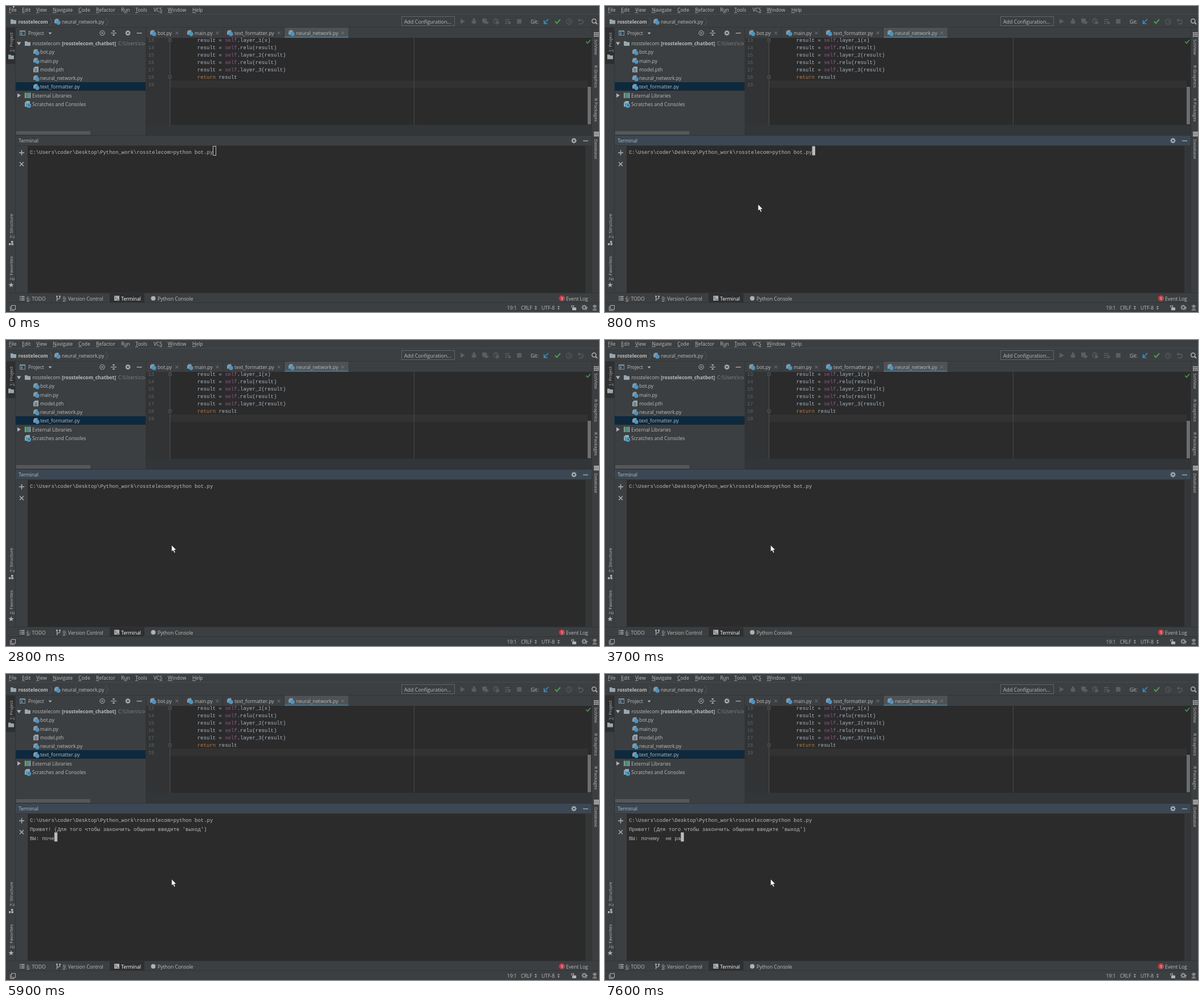
An HTML page with a canvas that plays this animation: 1041x538 px, repeating every 8 s.

```html
<!DOCTYPE html>
<html lang="en">
<head>
<meta charset="utf-8">
<title>Chatbot terminal</title>
<style>
  html, body { margin: 0; width: 100%; height: 100%; overflow: hidden; background: #3c3f41; }
  canvas { display: block; }
</style>
</head>
<body>
<canvas id="stage" width="1041" height="538"></canvas>
<script>
const W = 1041, H = 538, LOOP = 8000;
const SANS = '"Open Sans", "Noto Sans", sans-serif';
const UI = '8.6px ' + SANS, BOLD = 'bold ' + UI, SIDE = '8px ' + SANS, BUTTON = '8.9px ' + SANS;
const MONO = '8.93px "Liberation Mono", "Courier New", monospace';
const CELL = 5.36;
const PANEL = '#3c3f41', DARK = '#2b2b2b', EDGE = '#323435', TEXT = '#bbbbbb', ICON = '#afb1b3', OFF = '#5b5d5f';
const TAU = Math.PI * 2;

const stage = document.getElementById('stage');
const screen = stage.getContext('2d');
const base = document.createElement('canvas');
base.width = W;
base.height = H;
let g = base.getContext('2d');

function rect(x, y, w, h, color) {
  g.fillStyle = color;
  g.fillRect(x, y, w, h);
}

function frame(x, y, w, h, color, lw = 1) {
  g.strokeStyle = color;
  g.lineWidth = lw;
  g.strokeRect(x, y, w, h);
}

function dot(x, y, r, color) {
  g.fillStyle = color;
  g.beginPath();
  g.arc(x, y, r, 0, TAU);
  g.fill();
}

function ring(x, y, r, color, lw = 1) {
  g.strokeStyle = color;
  g.lineWidth = lw;
  g.beginPath();
  g.arc(x, y, r, 0, TAU);
  g.stroke();
}

function trace(pts) {
  g.beginPath();
  for (let i = 0; i < pts.length; i += 2) g.lineTo(pts[i], pts[i + 1]);
}

function line(color, lw, ...pts) {
  trace(pts);
  g.strokeStyle = color;
  g.lineWidth = lw;
  g.stroke();
}

function poly(color, ...pts) {
  trace(pts);
  g.closePath();
  g.fillStyle = color;
  g.fill();
}

// Draws text around a vertical centre; "&" underlines the next letter.
function label(str, x, cy, color = TEXT, font = UI) {
  const at = str.indexOf('&');
  const s = str.replace('&', '');
  g.font = font;
  g.fillStyle = color;
  g.fillText(s, x, cy + 3);
  if (at < 0) return;
  const left = g.measureText(s.slice(0, at)).width;
  rect(x + left, cy + 4.3, g.measureText(s[at]).width, 0.8, color);
}

function turned(str, x, y, dir) {
  g.save();
  g.translate(x, y);
  g.rotate(dir * Math.PI / 2);
  label(str, 0, 0, TEXT, SIDE);
  g.restore();
}

function mono(str, x, cy, color) {
  label(str, x, cy, color, MONO);
}

function page(x, y) {
  poly('#9aa7b0', x + 3, y, x + 9, y, x + 9, y + 10, x, y + 10, x, y + 3);
}

function pyFile(x, cy) {
  poly('#8b979f', x + 2.5, cy - 5, x + 7.5, cy - 5, x + 7.5, cy + 3, x, cy + 3, x, cy - 2.5);
  dot(x + 7, cy + 1.8, 3.7, '#4596c8');
}

function folder(x, cy) {
  poly('#9aa7b0', x, cy - 4, x + 4, cy - 4, x + 5.3, cy - 2.5, x + 10, cy - 2.5, x + 10, cy + 4, x, cy + 4);
}

function cross(x, y, r, color, lw = 1) {
  line(color, lw, x - r, y - r, x + r, y + r);
  line(color, lw, x + r, y - r, x - r, y + r);
}

function gear(x, y, color = ICON) {
  for (let i = 0; i < 8; i++) {
    const c = Math.cos(i * TAU / 8), s = Math.sin(i * TAU / 8);
    line(color, 1.6, x + 2.5 * c, y + 2.5 * s, x + 4.7 * c, y + 4.7 * s);
  }
  ring(x, y, 2.6, color, 1.7);
}

function chevron(x, cy) {
  line('#55585a', 1, x, cy - 7, x + 4, cy, x, cy + 7);
}

function bars(x, y) {
  for (let i = 0; i < 3; i++) {
    rect(x, y + i * 3, 1.6, 1.5, ICON);
    rect(x + 2.6, y + i * 3, 6, 1.5, ICON);
  }
}

function drawMenu() {
  const items = [['&File', 5], ['&Edit', 28], ['&View', 53], ['&Navigate', 82], ['&Code', 127], ['&Refactor', 158],
    ['R&un', 202], ['&Tools', 227], ['VC&S', 259], ['&Window', 284], ['&Help', 327]];
  for (const [s, x] of items) label(s, x, 7);
  rect(0, 14, W, 1, '#484b4d');
}

function drawToolbar() {
  folder(8, 27.5);
  label('rosstelecom', 21.5, 27.5, TEXT, BOLD);
  chevron(77, 27.5);
  pyFile(85, 27.5);
  label('neural_network.py', 98, 27.5);
  chevron(175, 27.5);
  frame(694.5, 18.5, 93, 16, '#626567');
  label('Add Configuration...', 699, 27.5, TEXT, BUTTON);

  poly(OFF, 798, 22.5, 806, 27, 798, 31.5);
  dot(821.5, 28, 3.6, OFF);
  rect(817, 26, 9, 1, OFF);
  rect(817, 29, 9, 1, OFF);
  dot(821.5, 23.5, 2, OFF);
  poly(OFF, 836, 22, 844, 22, 844, 27, 840, 31.5, 836, 28);
  poly(OFF, 842, 25, 848, 29, 842, 33);
  ring(860, 26.5, 4, OFF, 1.3);
  line(OFF, 1, 860, 24, 860, 27, 862, 27);
  poly(OFF, 861, 26, 867, 29.5, 861, 33);
  for (let i = 0; i < 3; i++) rect(876, 23 + i * 3.5, 8 - i * 2, 1.4, OFF);
  poly(OFF, 882, 26, 887, 29.5, 882, 33);
  rect(897, 23, 8, 8, OFF);

  label('Git:', 921, 27.5);
  line('#3592c4', 1.7, 952, 23, 945, 30.5);
  line('#3592c4', 1.7, 944.7, 25, 944.7, 31, 950.5, 31);
  line('#499c54', 2, 964, 27, 967, 30.5, 973, 23.5);
  ring(988.5, 27.5, 4.6, OFF, 1.2);
  line(OFF, 1.1, 988.5, 24.5, 988.5, 28, 991, 29);
  line(OFF, 1.3, 1007, 22.5, 1004.5, 25, 1007, 27.5);
  line(OFF, 1.3, 1005, 25, 1011, 25, 1013, 27, 1013, 29, 1011, 31.5, 1006, 31.5);
  ring(1032.3, 26.3, 3.6, ICON, 1.5);
  line(ICON, 1.8, 1035, 29, 1038, 32);
  rect(0, 37, W, 1, EDGE);
}

function drawStripes() {
  rect(0, 38, 16, 64, '#2d2f30');
  rect(16, 38, 1, 466, EDGE);
  rect(1028, 38, 1, 466, EDGE);
  turned('&1: Project', 9.3, 81, -1);
  folder(4, 89.5);
  turned('&7: Structure', 9.3, 408.5, -1);
  rect(9, 413, 3.4, 3.4, ICON);
  rect(5, 417, 3.4, 3.4, ICON);
  rect(9.5, 417, 3.4, 3.4, ICON);
  turned('&2: Favorites', 9.3, 482.5, -1);
  const star = [];
  for (let i = 0; i < 10; i++) {
    const r = i % 2 ? 2 : 5, a = i * Math.PI / 5;
    star.push(9 + r * Math.sin(a), 490.5 - r * Math.cos(a));
  }
  poly(ICON, ...star);

  for (let i = 0; i < 9; i++) rect(1032 + i % 3 * 3, 46 + Math.floor(i / 3) * 3, 2.2, 2.2, ICON);
  turned('SciView', 1036, 58.5, 1);
  turned('R Graphics', 1036, 104, 1);
  turned('R Packages', 1036, 162, 1);
  for (let i = 0; i < 3; i++) rect(1032, 221 + i * 3, 9, 2.3, ICON);
  turned('Database', 1036, 234, 1);
}

function drawProject() {
  frame(24.5, 43.5, 9, 8, '#87939a');
  rect(24, 43, 10, 2.2, '#87939a');
  rect(26, 46.5, 3, 4, '#3592c4');
  label('Project', 39, 48);
  poly(ICON, 74.5, 46.5, 80.5, 46.5, 77.5, 50);
  ring(169, 47.5, 4.2, ICON, 1);
  cross(169, 47.5, 2, ICON, 1);
  rect(184, 47, 10, 1.2, ICON);
  poly(ICON, 186.5, 43, 191.5, 43, 189, 46);
  poly(ICON, 186.5, 52, 191.5, 52, 189, 49);
  gear(214, 47.5);
  rect(229.5, 47, 9, 1.3, ICON);

  rect(17, 134, 228, 15, '#0d293e');
  poly(ICON, 19, 63.5, 26.5, 63.5, 22.7, 69);
  folder(33, 66);
  label('rosstelecom', 46.5, 66);
  label('[rosstelecom_chatbot]', 98, 66, TEXT, BOLD);
  g.save();
  g.beginPath();
  g.rect(17, 56, 227, 20);
  g.clip();
  label('C:\\Users\\coder', 197, 66, '#808080');
  g.restore();

  const files = ['bot.py', 'main.py', 'model.pth', 'neural_network.py', 'text_formatter.py'];
  files.forEach((name, i) => {
    const y = 81 + i * 15.3;
    if (name.endsWith('.py')) pyFile(48, y);
    else {
      page(48, y - 5);
      for (let k = 0; k < 3; k++) rect(50, y - 1.5 + k * 2, 5, 0.9, '#4b555c');
    }
    label(name, 60, y + 0.2);
  });
  poly(ICON, 20, 153.5, 26, 157.3, 20, 161);
  ['#9aa7b0', '#62b543', '#40b6e0', '#9aa7b0'].forEach((c, i) => rect(33 + i * 2.8, 152.5, 1.9, 9.5, c));
  label('External Libraries', 46, 157.5);
  page(33, 167);
  line('#3c3f41', 0.9, 35, 171, 37, 173, 35, 175);
  dot(40, 175, 4, '#40a6d0');
  line('#28444f', 1, 40, 172.5, 40, 175.3, 42, 175.3);
  label('Scratches and Consoles', 46, 173);
  rect(18, 220, 130, 6, '#555759');
}

function drawEditor() {
  rect(245, 56, 783, 153, DARK);
  rect(245, 56, 43, 153, '#313335');
  rect(245, 209, 783, 18, '#333638');
  rect(288, 131, 733, 13, '#323232');
  rect(287.5, 56, 1, 153, '#555555');
  rect(716, 56, 1, 153, '#4b4b4b');
  rect(1021, 142, 6, 66, '#6c6d6e');

  const calls = ['layer_1(x)', 'relu(result)', 'layer_2(result)', 'relu(result)', 'layer_3(result)'];
  for (let i = 0; i < 7; i++) {
    const y = 60 + i * 13;
    mono(String(13 + i), 249.5, y, '#606366');
    if (i < 5) {
      mono('result = ', 336, y, '#a9b7c6');
      mono('self', 336 + 9 * CELL, y, '#94558d');
      mono('.' + calls[i], 336 + 13 * CELL, y, '#a9b7c6');
    }
  }
  mono('return', 336, 125, '#cc7832');
  mono('result', 336 + 7 * CELL, 125, '#a9b7c6');
  for (const y of [60, 125]) {
    rect(285, y - 3, 6, 6, '#313335');
    frame(285.5, y - 2.5, 5, 5, '#55585a', 0.8);
    rect(287, y - 0.5, 2, 1, '#606366');
  }
  line('#499c54', 1.5, 1018.3, 62.5, 1021, 65.5, 1026, 59.5);

  rect(245, 38, 783, 18, PANEL);
  rect(488, 38, 113, 18, '#4e5254');
  rect(488, 53.5, 113, 2.5, '#4b6e80');
  const tabs = [['bot.py', 253, 300], ['main.py', 318, 371], ['text_formatter.py', 388, 479], ['neural_network.py', 496, 591]];
  for (const [name, x, close] of tabs) {
    pyFile(x, 47.5);
    label(name, x + 13, 48);
    cross(close, 47.5, 2.4, '#7d8082', 1);
    if (close < 480) rect(close + 9, 38, 1, 18, EDGE);
  }
  rect(245, 38, 1, 189, EDGE);
  rect(17, 227, 1011, 1, EDGE);
}

function drawTerminal() {
  rect(38, 246, 979, 258, DARK);
  rect(1017, 246, 11, 258, '#343638');
  rect(23, 257.3, 9, 1.5, ICON);
  rect(26.8, 253.5, 1.5, 9, ICON);
  cross(27.5, 278, 3.4, ICON, 1.4);
}

function drawBottom() {
  rect(0, 504, W, 1, EDGE);
  rect(0, 521, W, 1, EDGE);
  rect(182, 505, 61, 16, '#2d2f30');
  bars(24, 510);
  label('&6: TODO', 36, 514.5);
  line(ICON, 1.2, 89.5, 510, 89.5, 519);
  line(ICON, 1.2, 89.5, 516, 94.5, 514, 94.5, 511);
  dot(89.5, 510.5, 1.5, ICON);
  dot(94.5, 510.5, 1.5, ICON);
  label('&9: Version Control', 99.5, 514.5);
  rect(190, 509.5, 9, 8.5, ICON);
  line('#2d2f30', 1, 191.5, 511.5, 193.7, 513.5, 191.5, 515.5);
  rect(194.5, 515.5, 3, 1, '#2d2f30');
  label('Terminal', 202, 514.5, '#ffffff');
  dot(258.5, 514, 4, ICON);
  label('Python Console', 266, 514.5);
  dot(976, 514, 5, '#c7424a');
  label('1', 973.8, 514, '#ffffff', SIDE);
  label('Event Log', 983, 514.5);

  frame(9.5, 526.5, 7, 7, ICON);
  line(ICON, 1, 7.5, 528, 7.5, 535.5, 15, 535.5);
  label('19:1', 879.5, 530.5);
  label('CRLF', 904, 530.5);
  label('UTF-8', 940, 530.5);
  for (const x of [930, 970]) {
    poly(ICON, x - 2, 529.5, x, 527, x + 2, 529.5);
    poly(ICON, x - 2, 531.5, x, 534, x + 2, 531.5);
  }
  rect(994, 530, 7, 5, ICON);
  line(ICON, 1.2, 993, 530, 993, 527, 996.5, 527, 996.5, 530);
  gear(1015, 530, '#909294');
  label('?', 1017, 532, ICON, BOLD);
  dot(1033.5, 528, 2.7, '#858789');
  rect(1029.5, 527, 8, 1.2, '#858789');
  poly('#858789', 1029.5, 535.5, 1031, 531.5, 1036, 531.5, 1037.5, 535.5);
  dot(1032, 533, 0.8, PANEL);
  dot(1035, 533, 0.8, PANEL);
}

function drawBase() {
  rect(0, 0, W, H, PANEL);
  drawMenu();
  drawToolbar();
  drawStripes();
  drawProject();
  drawEditor();
  drawTerminal();
  drawBottom();
}

const command = 'C:\\Users\\coder\\Desktop\\Python_work\\rosstelecom>python bot.py';
const greeting = "Привет! (Для того чтобы закончить общение введите 'выход')";
const question = 'почему  не ра';
const keys = [5200, 5300, 5600, 5900, 6200, 6400, 6500, 6600, 6900, 7000, 7200, 7500, 7600];
const blinks = [1800, 2300, 2800, 3300, 3700, 4200, 4800, 5200];
const path = [[8, -11], [40, 70], [110, 240], [190, 410], [245, 498], [264, 430], [268, 372],
  [268, 348], [268, 348], [276, 353], [290, 360]];

const passed = (times, t) => times.filter(v => v <= t).length;

function drawHeader(t) {
  rect(17, 228, 1011, 18, t < 800 ? PANEL : '#3b4754');
  rect(17, 245, 1011, 1, EDGE);
  label('Terminal', 22, 237);
  gear(997, 236.7);
  rect(1013, 236.5, 9, 1.3, ICON);
}

function drawCaret(row, col, filled) {
  const x = 42 + col * CELL, y = 246 + row * 16;
  if (filled) rect(x, y + 0.5, CELL, 16, TEXT);
  else frame(Math.floor(x) + 0.5, y + 0.5, 5, 16, TEXT);
}

function drawConsole(t) {
  const typed = passed(keys, t);
  mono(command, 42, 256.5, TEXT);
  if (t >= 4400) {
    mono(greeting, 42, 272.5, TEXT);
    mono('ВЫ: ' + question.slice(0, typed), 42, 288.5, TEXT);
  }
  if (passed(blinks, t) % 2) return;
  if (t < 1400) drawCaret(0, command.length, t >= 700);
  else if (t < 4400) drawCaret(1, 0, true);
  else drawCaret(2, 4 + typed, true);
}

function drawMouse(t) {
  const [x, y] = path[Math.min(path.length - 1, Math.floor(t / 100))];
  g.save();
  g.translate(x + 0.3, y + 0.3);
  poly('#ffffff', 0.5, 0.5, 0.5, 11.8, 3, 9.5, 5, 14, 6.9, 13.2, 5, 8.9, 8.5, 8.7);
  g.strokeStyle = 'rgba(0,0,0,0.7)';
  g.lineWidth = 0.6;
  g.stroke();
  g.restore();
}

function render(t) {
  g.drawImage(base, 0, 0);
  drawHeader(t);
  drawConsole(t);
  drawMouse(t);
}

drawBase();
g = screen;
const start = performance.now();

function tick() {
  render((performance.now() - start) % LOOP);
  requestAnimationFrame(tick);
}
tick();
</script>
</body>
</html>
```
